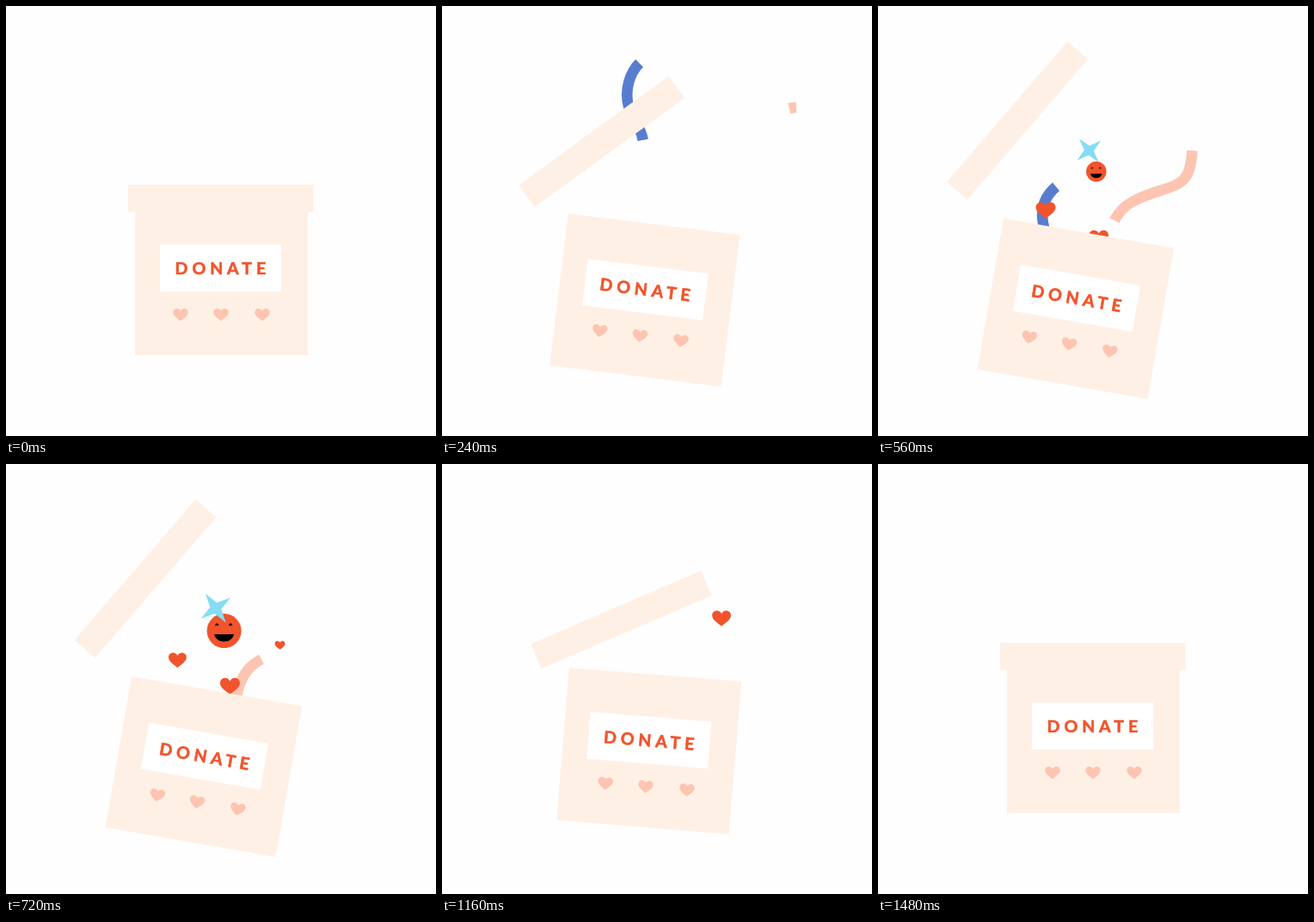
Animation, 500 px wide and 500 px high, one loop 1560 ms. Source, as an HTML page:

```html
<!DOCTYPE html>
<html lang="en">
<head>
<meta charset="utf-8">
<title>Donate box</title>
<style>
  html, body { margin: 0; width: 100%; height: 100%; overflow: hidden; background: #fefefe; }
  svg { display: block; width: 100vw; height: 100vh; }
  .ribbon { fill: none; stroke-width: 12.5; }
  .label {
    font: 700 19.6px Lato, "Open Sans", sans-serif;
    letter-spacing: 4.9px;
    fill: #f1542c; stroke: #f1542c; stroke-width: .6;
  }
</style>
</head>
<body>
<svg viewBox="0 0 500 500">
  <defs>
    <path id="heart" d="M0 .42C-.14 .28-.5 .1-.5-.16C-.5-.32-.38-.42-.26-.42C-.13-.42-.04-.35 0-.26C.04-.35 .13-.42 .26-.42C.38-.42 .5-.32 .5-.16C.5 .1 .14 .28 0 .42Z"/>
  </defs>

  <path id="blue" class="ribbon" stroke="#587dd0"
    d="M229.5 66.5C218 78 212 98 217 117C221 131 234 142 234.5 164C235 184 225 196 211 207C199 216 191 226 191 243C191 256 196 266 198 276"/>
  <path id="pink" class="ribbon" stroke="#fdc5b1"
    d="M412 118C387 119 367 143 365.5 165C365 177 364 186 360 195C352 213 325 212 297 227C281 235 271.500 251 268 270C266 282 265 290 265 300"/>

  <g id="smile">
    <circle r="20" fill="#f1542c"/>
    <path d="M-11.500 4H11.500C10 9.500 6 12.500 0 12.500S-10 9.500-11.500 4Z"/>
    <path d="M-10-6A1.700 2.600 0 0 1-6.600-6L-8.300-6.800ZM5.900-6A1.700 2.600 0 0 1 9.300-6L7.600-6.800Z" stroke="#000" stroke-width=".5"/>
  </g>
  <g id="hearts" fill="#f1542c"></g>
  <path id="star" fill="#84ddf5" d="M0-21L4.600-4.600L21 0L4.600 4.600L0 21L-4.600 4.600L-21 0L-4.600-4.600Z"/>

  <g id="box">
    <rect x="150" y="228" width="201" height="178" fill="#fff0e5"/>
    <rect x="179" y="277.500" width="141" height="54.500" fill="#fff"/>
    <text class="label" x="196.600" y="312">DONATE</text>
    <g fill="#fdc5b1">
      <use href="#heart" transform="translate(203 359) scale(17.500)"/>
      <use href="#heart" transform="translate(250 359) scale(17.500)"/>
      <use href="#heart" transform="translate(298 359) scale(17.500)"/>
    </g>
  </g>
  <rect id="lid" x="142" y="208" width="215.500" height="31.500" fill="#fff0e5"/>
</svg>
<script>
const LOOP = 1560, STEP = 40;
const $ = id => document.getElementById(id);
const ramp = (t, start, span) => Math.min(1, Math.max(0, (t - start) / span));
const sineOut = u => Math.sin(u * Math.PI / 2);
const smooth = u => u * u * (3 - 2 * u);

const ribbons = [
  { el: $('blue'), head: [45, 440], tail: [245, 500] },
  { el: $('pink'), head: [183, 530], tail: [344, 608] }
].map(r => ({ ...r, len: r.el.getTotalLength() }));

const hearts = [
  { born: 180, x: 195, y: 260.6, rise: .06 },
  { born: 360, x: 261.2, y: 284.8, rise: .073 },
  { born: 640, x: 320.8, y: 216.5, rise: .071 }
].map(h => {
  const el = document.createElementNS('http://www.w3.org/2000/svg', 'use');
  el.setAttribute('href', '#heart');
  $('hearts').append(el);
  return { ...h, el };
});

// Pops in, holds, then shrinks away
const life = age => sineOut(ramp(age, 0, 230)) * (1 - ramp(age, 470, 230) ** 2);

function place(el, x, y, size, turn = 0) {
  el.style.display = size > 0 ? '' : 'none';
  el.setAttribute('transform', `translate(${x} ${y}) rotate(${turn}) scale(${size})`);
}

function swing(el, cx, cy, dx, dy, turn, p) {
  el.setAttribute('transform', `translate(${dx * p} ${dy * p}) rotate(${turn * p} ${cx} ${cy})`);
}

function trim({ el, len, head, tail }, t) {
  const a = len * smooth(ramp(t, ...tail));
  const b = len * smooth(ramp(t, ...head));
  el.style.display = b - a > .1 ? '' : 'none';
  el.setAttribute('stroke-dasharray', `0 ${a} ${b - a} ${len * 2}`);
}

function draw(t) {
  const shut = 1 - sineOut(ramp(t, 990, 480));
  swing($('lid'), 249.75, 223.75, -87.75, -90.5, -49.3, sineOut(ramp(t, 0, 460)) * shut);
  swing($('box'), 250.5, 317, -20.7, 35, 9.9, sineOut(ramp(t, 0, 475)) * shut);

  ribbons.forEach(r => trim(r, t));

  for (const h of hearts) {
    const age = t - h.born;
    const sway = -4.5 * Math.cos((age - 200) / 360 * Math.PI);
    place(h.el, h.x + sway, h.y - h.rise * age, 23 * life(age));
  }

  const fall = Math.max(0, t - 650) ** 2 * .00029;
  const pop = t < 1240 ? sineOut(ramp(t, 480, 200)) : 0;
  place($('smile'), 253.8 - fall * .14, 192.6 + fall, pop);

  const spin = (t - 720) / 240;
  place($('star'), 243.8 - 2.3 * spin, 167.6 - spin * .6, life(t - 410), -35 + 7 * spin);
}

const begin = performance.now();
function tick() {
  const t = (performance.now() - begin) % LOOP;
  draw(Math.floor(t / STEP) * STEP);
  requestAnimationFrame(tick);
}
tick();
</script>
</body>
</html>
```
